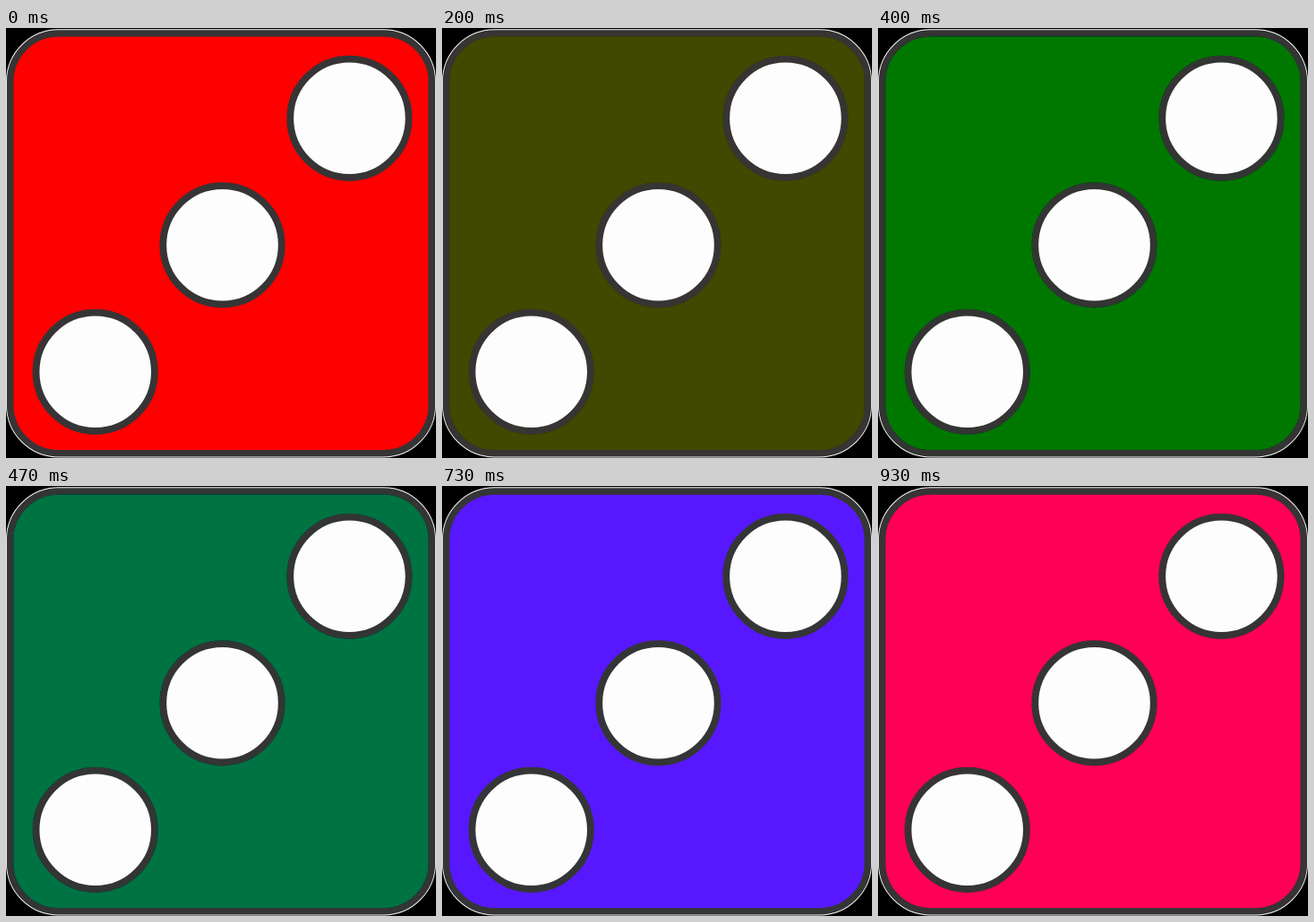
An HTML page that plays this animation: 480x480 px, repeating every 0.99 s.

```html
<!DOCTYPE html>
<html lang="en">
<head>
<meta charset="utf-8">
<title>Colour-cycling die</title>
<style>
  html, body { margin: 0; width: 100%; height: 100%; overflow: hidden; background: #000; }
  svg { display: block; width: 100vw; height: 100vh; }
  .halo { fill: none; stroke: #fff; stroke-width: 9.4; }
  .face { fill: #f00; stroke: #373435; stroke-width: 7.6; }
  .pip { fill: #fdfdfd; stroke: #373435; stroke-width: 7.8; }
</style>
</head>
<body>
<svg id="die" viewBox="0 0 480 480">
  <rect class="halo" x="4.7" y="6" width="470.6" height="468.7" rx="54"/>
  <rect class="face" x="4.7" y="6" width="470.6" height="468.7" rx="54"/>
  <circle class="pip" cx="383.4" cy="100.8" r="66.2"/>
  <circle class="pip" cx="241.5" cy="242.3" r="66.2"/>
  <circle class="pip" cx="99.7" cy="383.8" r="66.2"/>
</svg>
<script>
  const LOOP = 990, STEPS = 15;

  // Hard hue steps at 15 per second, with times rounded to 10 ms.
  const frames = Array.from({ length: STEPS }, (_, i) => ({
    offset: Math.round(i * 20 / 3) * 10 / LOOP,
    filter: `hue-rotate(${i * 360 / STEPS}deg)`,
    easing: 'step-end'
  }));
  frames.push({ ...frames[STEPS - 1], offset: 1 });

  document.getElementById('die').animate(frames, { duration: LOOP, iterations: Infinity });
</script>
</body>
</html>
```
